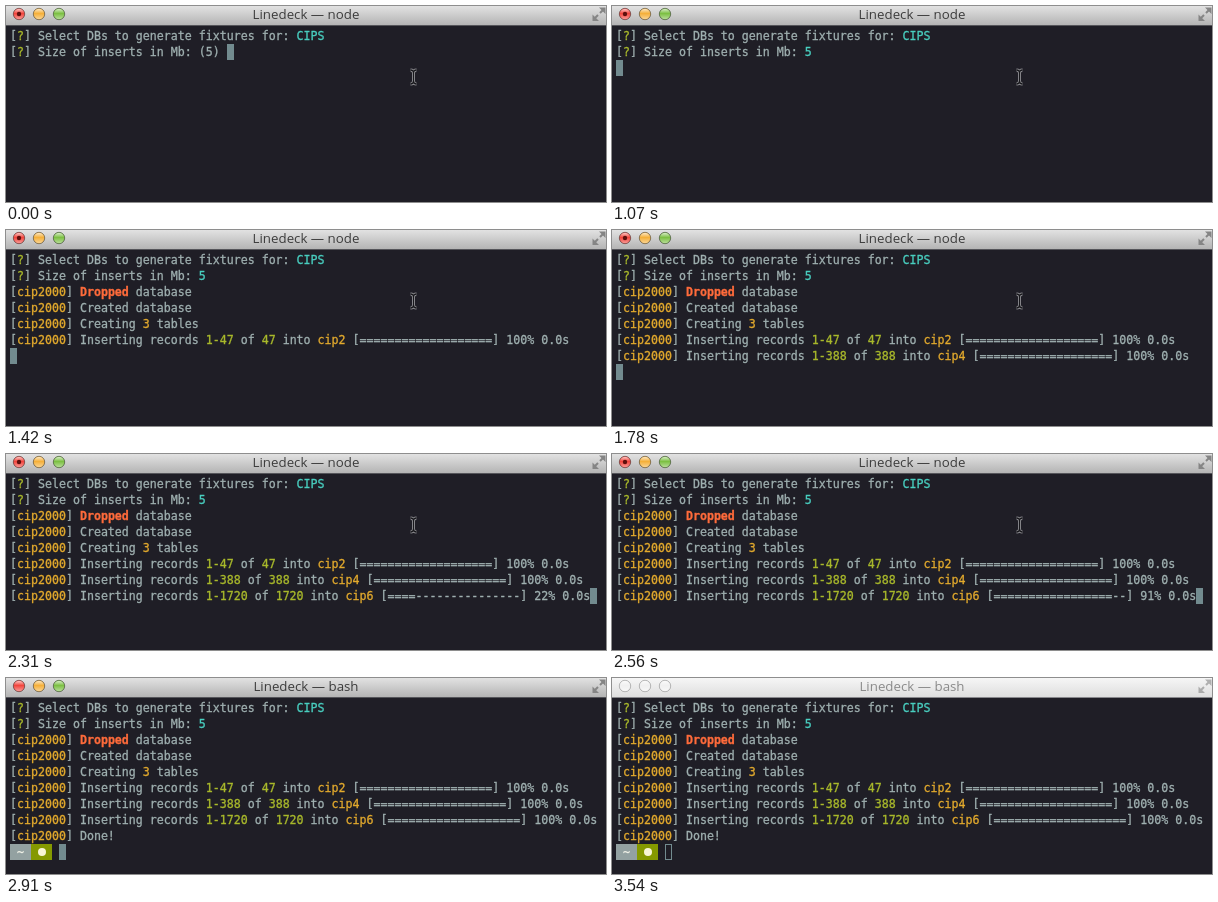
An HTML page that plays this animation: 600x196 px, repeating every 3.62 s.

```html
<!DOCTYPE html>
<html lang="en">
<head>
<meta charset="utf-8">
<title>Fixture generator</title>
<style>
  html, body { margin: 0; width: 100%; height: 100%; overflow: hidden; background: #1f1e26; }
  #stage { position: relative; width: 600px; height: 196px; overflow: hidden; background: #1f1e26; }
  #bar {
    position: absolute; inset: 0 0 auto; height: 20px; box-sizing: border-box;
    background: linear-gradient(#e2e2e2, #b4b4b4); border-bottom: 1px solid #55555a;
    font: 13.3px/16px "Open Sans", "Noto Sans", sans-serif; color: #3c3c3c; text-align: center;
  }
  #bar svg { position: absolute; left: 0; top: 0; }
  #out {
    position: absolute; left: 4px; top: 22px; margin: 0;
    font: 11.627px/16px "DejaVu Sans Mono", monospace; color: #9fb0b0;
    font-variant-ligatures: none; -webkit-text-stroke: .3px;
  }
  #out i { font-style: normal; }
  .lime { color: #a9b92b; }
  .gold { color: #e3aa2d; }
  .cyan { color: #49cfc0; }
  #out .hot { color: #ff6b3b; font-weight: bold; }
  .seg, .caret { display: inline-block; height: 16px; vertical-align: top; box-sizing: border-box; }
  .seg { position: relative; width: 21px; text-align: center; color: #f4f4ea; }
  .home { background: #93a1a1; }
  .mark { background: #859900; }
  .mark::after {
    content: ""; position: absolute; left: 6.5px; top: 4px;
    width: 8px; height: 8px; border-radius: 50%; background: #f8f5d5;
  }
  .caret { width: 7px; background: #728b8f; }
  .idle .caret { background: none; border: 1px solid #728b8f; }
  .idle #bar { background: linear-gradient(#f6f6f6, #dedede); border-color: #88888c; color: #8a8a8a; }
  .idle #lights { fill: #f0f0f0; stroke-opacity: .25; }
  .idle #zoom { opacity: .6; }
  #mouse { position: absolute; left: 0; top: 0; }
</style>
</head>
<body>
<div id="stage">
  <div id="bar">
    <span id="title"></span>
    <svg width="600" height="19">
      <defs>
        <linearGradient id="shine" x2="0" y2="1">
          <stop offset="0" stop-color="#fff" stop-opacity=".7"/>
          <stop offset=".45" stop-color="#fff" stop-opacity="0"/>
          <stop offset="1" stop-color="#fff" stop-opacity=".45"/>
        </linearGradient>
      </defs>
      <g id="lights" stroke="#000" stroke-opacity=".4"></g>
      <g id="gloss" fill="url(#shine)"></g>
      <circle id="busy" cx="13" cy="8" r="2.2" fill="#5e100d"/>
      <g id="zoom" fill="#858585" stroke="#858585" stroke-width="2">
        <path d="M594 7l4-4M592 9l-4 4"/>
        <path d="M593 1.5h6.5v6.5zM586.5 8.5v6.5h6.5z" stroke="none"/>
      </g>
    </svg>
  </div>
  <pre id="out"></pre>
  <svg id="mouse" width="9" height="18" fill="none">
    <defs>
      <path id="beam" d="M1.5 2q3 0 3 3v8q0 3-3 3M7.5 2q-3 0-3 3v8q0 3 3 3"/>
    </defs>
    <use href="#beam" stroke="#98989c" stroke-width="3"/>
    <use href="#beam" stroke="#18181c" stroke-width="1.3"/>
  </svg>
</div>
<script>
const LOOP = 3620, EXIT = 2740, BLUR = 3540, BAR = 19;
const $ = id => document.getElementById(id);
const paint = cls => s => `<i class="${cls}">${s}</i>`;
const [lime, gold, cyan, hot] = ['lime', 'gold', 'cyan', 'hot'].map(paint);

const ask = (q, a) => `[${lime('?')}] ${q}: ${a}`;
const log = s => `[${gold('cip2000')}] ${s}`;
const insert = (n, table, pct = 100) => {
  const done = Math.round(pct / 100 * BAR);
  const bar = '='.repeat(done) + '-'.repeat(BAR - done);
  return log(`Inserting records ${lime('1-' + n)} of ${lime(n)} into ${gold(table)} [${bar}] ${pct}% 0.0s`);
};

// Each step: start time and the screen text; the caret follows the text.
const steps = [];
let screen = ask('Select DBs to generate fixtures for', cyan('CIPS')) + '\n';
const show = (at, partial = '') => steps.push([at, screen + partial]);
const print = (at, ...lines) => {
  screen += lines.join('\n') + '\n';
  show(at);
};

show(0, ask('Size of inserts in Mb', '(5) '));
print(1070, ask('Size of inserts in Mb', cyan(5)));
print(1160, log(hot('Dropped') + ' database'), log('Created database'));
print(1340, log(`Creating ${gold(3)} tables`));
print(1420, insert(47, 'cip2'));
show(1690, insert(388, 'cip4', 52));
print(1780, insert(388, 'cip4'));
[2310, 2400, 2480, 2560].forEach((at, i) =>
  show(at, insert(1720, 'cip6', Math.floor(22.9 * (i + 1)))));
print(2650, insert(1720, 'cip6'), log('Done!'));
show(EXIT, '<span class="seg home">~</span><span class="seg mark"></span> ');

// Pointer: start time, left, top.
const moves = [[0, 403, 62], [2740, 498, 116], [2830, 575, 160], [2910, -20, 0]];
const current = (list, t) => list.findLast(([at]) => at <= t);

const dot = (x, r, attr = '') => `<circle cx="${x}" cy="8" r="${r}" ${attr}/>`;
const lights = [[13, '#f2453d'], [33, '#f5b03a'], [53, '#7cc043']];
$('lights').innerHTML = lights.map(([x, c]) => dot(x, 5.7, `style="fill:var(--light, ${c})"`)).join('');
$('gloss').innerHTML = lights.map(([x]) => dot(x, 5.2)).join('');

let shown;
const t0 = performance.now();
function draw() {
  const t = Math.max(0, performance.now() - t0) % LOOP;
  const text = current(steps, t)[1];
  if (text !== shown) $('out').innerHTML = (shown = text) + '<span class="caret"></span>';
  const [, x, y] = current(moves, t);
  $('mouse').style.transform = `translate(${x}px, ${y}px)`;
  $('title').textContent = 'Linedeck — ' + (t < EXIT ? 'node' : 'bash');
  $('busy').style.display = t < EXIT ? '' : 'none';
  $('stage').className = t < BLUR ? '' : 'idle';
  $('lights').style.setProperty('--light', t < BLUR ? 'initial' : '#f0f0f0');
  requestAnimationFrame(draw);
}
draw();
</script>
</body>
</html>
```
